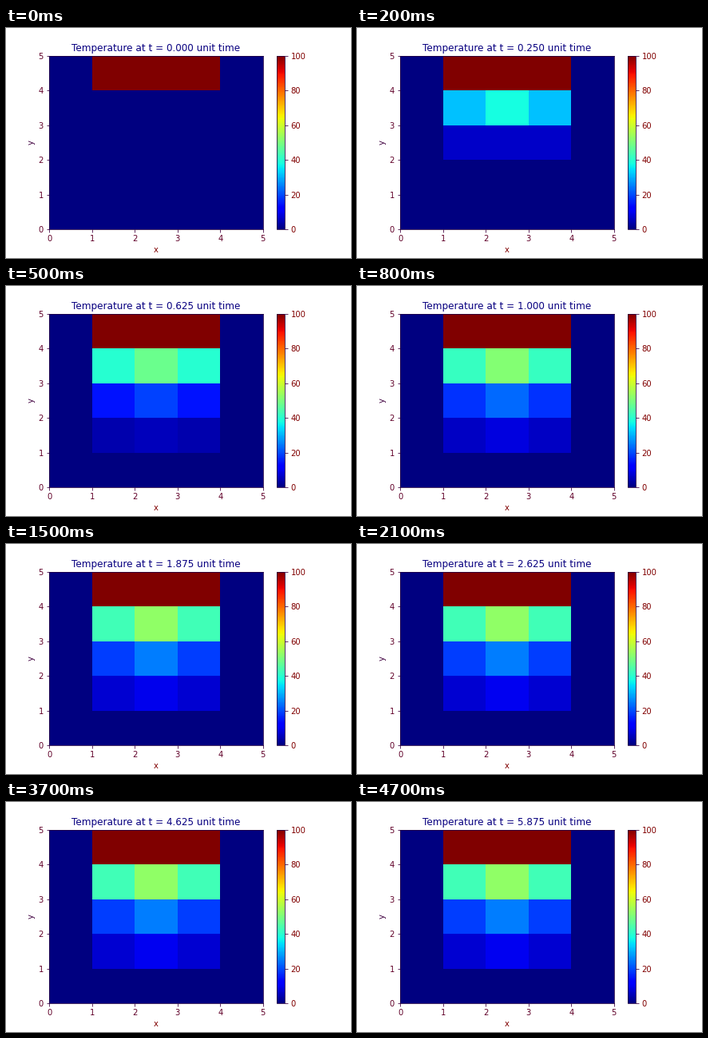
Recreate the animation shown at these times as a matplotlib script. Size 432 by 288 pixels, loop 4.8 s.

```python
import numpy as np
import matplotlib.pyplot as plt
from matplotlib.animation import FuncAnimation

SIZE = 5
STEPS = 48
DT = 0.125
NAVY, MAROON, PLUM = "#080080", "#800000", "#400040"


def solve():
    """Explicit heat equation with a hot strip along the top edge."""
    u = np.zeros((STEPS, SIZE, SIZE))
    u[:, -1, 1:-1] = 100
    for k in range(STEPS - 1):
        a = u[k]
        u[k + 1, 1:-1, 1:-1] = (
            a[2:, 1:-1] + a[:-2, 1:-1] + a[1:-1, 2:] + a[1:-1, :-2]
        ) / 4
    return u


plt.rcParams.update({
    "font.family": "DejaVu Sans",
    "font.size": 10,
    "figure.subplot.left": 0.125,
    "figure.subplot.right": 0.9,
    "figure.subplot.bottom": 0.125,
    "figure.subplot.top": 0.88,
    "axes.edgecolor": "#200040",
    "xtick.color": PLUM,
    "ytick.color": PLUM,
})

heat = solve()
fig, ax = plt.subplots(figsize=(6, 4), dpi=72)
mesh = ax.pcolormesh(heat[0], cmap="jet", vmin=0, vmax=100)
bar = fig.colorbar(mesh, ax=ax)
bar.ax.tick_params(labelcolor=MAROON)
ax.tick_params(axis="both", labelcolor="#600028")
ax.set_xlabel("x", color=MAROON)
ax.set_ylabel("y", color=PLUM)
title = ax.set_title("", fontsize=12, color=NAVY)


def draw(k):
    mesh.set_array(heat[k])
    title.set_text(f"Temperature at t = {k * DT:.3f} unit time")
    return mesh, title


anim = FuncAnimation(fig, draw, frames=STEPS, interval=100, repeat=True)
plt.show()
```
